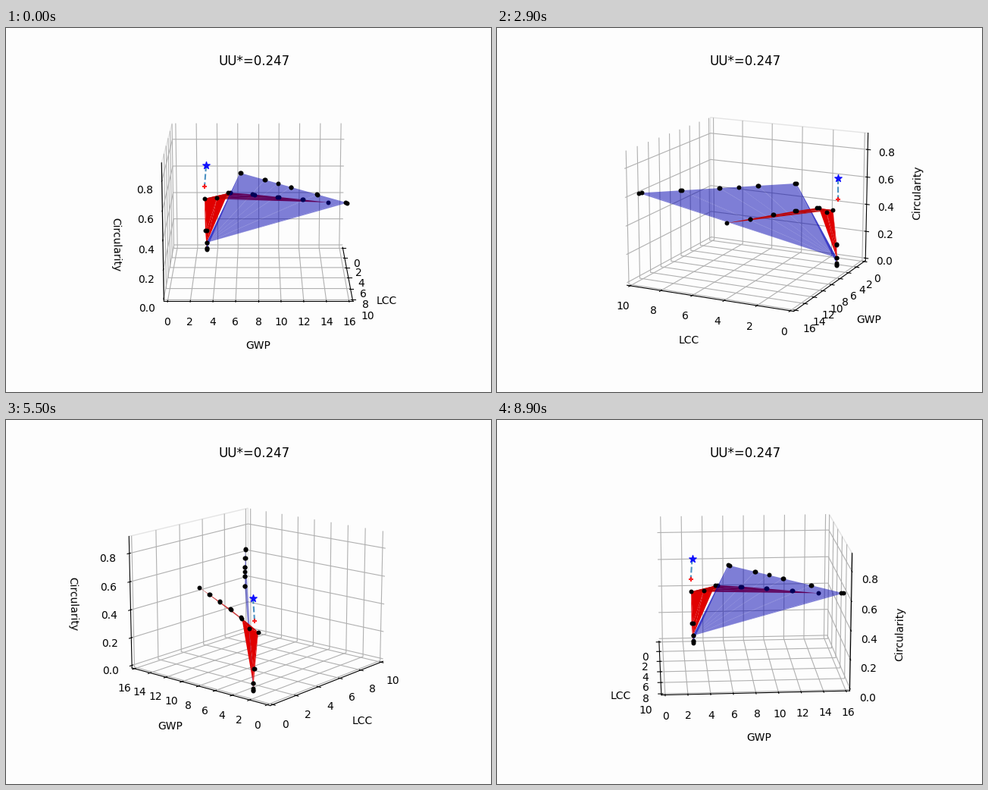
Animation, 640 px wide and 480 px high, one loop 9000 ms. Source, as a matplotlib script:

```python
import numpy as np
import matplotlib.pyplot as plt
from matplotlib.animation import FuncAnimation

FRAMES = 90
ELEV = 15
BG = "#fdfdfd"
UNIT = np.array([8.75, 14, 1.05])  # data per unit of the drawn box


def padded(top):
    """Limits from 0 to top with a small margin on both sides."""
    return -top / 48, top + top / 48


def between(a, b, t):
    return np.asarray(a) + t[:, None] * np.subtract(b, a)


# columns: LCC, GWP, circularity
foot = [0.794, 2.968, 0.053]
low = [0.787, 2.968, 0.006]

# rays of near-twin points, spreading away from one place on each line
d = np.array([-0.37, -0.125, 0, 0.125, 0.37, 0.63])
t = np.unique(0.37 + np.outer(d, [0.985, 1.015]))
blue = np.vstack([foot, low, between([2.565, 6.316, 0.629],
                                     [9.465, 15.69, 0.631], t)])
fan = [(0, 2, 1)] + [(0, k + 1, k) for k in range(2, len(blue) - 1)]

d = np.linspace(-1, 0, 5)
t = np.unique(1 + np.outer(d, [0.988, 1.012]))
ray = between([1.45, 5.2, 0], [4.419, 14.49, 0], t)
ray[:, 2] = 0.4485 + 0.0235 * np.sqrt(np.clip(t, 0, 1))
red = np.vstack([
    foot, [0.795, 2.960, 0.012], [0.796, 2.955, 0],
    [0.844, 2.83, 0.149], [0.846, 2.98, 0.149],
    [1.124, 2.80, 0.396], [1.22, 4.01, 0.402], ray,
])

utopia = np.array([0.80, 2.963, 0.632])
nearest = np.array([0.81, 2.80, 0.477])

fig = plt.figure(figsize=(6.4, 4.8), dpi=100, facecolor=BG)
ax = fig.add_subplot(projection="3d", facecolor=BG, computed_zorder=False)


def dots(points, **style):
    return ax.scatter(*points.T, depthshade=False, **style)


def front(points):
    """Artists of one surface: the sheet and its vertices."""
    return dots(points, color="black", marker=".", s=42)


groups = [
    (red, ax.plot_trisurf(*red.T, color="red"), front(red)),
    (blue, ax.plot_trisurf(*blue.T, triangles=fan, color="blue", alpha=0.5),
     front(blue)),
]

ax.plot(*np.array([utopia, nearest]).T, "--", color="C0", alpha=0.8)
dots(utopia[None], color="blue", marker="*", s=50, alpha=0.88, zorder=9)
dots(nearest[None], color="red", marker="+", alpha=0.85, zorder=9)

ax.set_xlim(*padded(10))
ax.set_ylim(*padded(16))
ax.set_zlim(*padded(0.9))
ax.set_xlabel("LCC", labelpad=10)
ax.set_ylabel("GWP", labelpad=10)
ax.set_zlabel("Circularity", labelpad=10)
ax.set_title("UU*=0.247")
for axis in (ax.xaxis, ax.yaxis, ax.zaxis):
    axis.pane.set(facecolor=BG, edgecolor=BG, alpha=1)
ax.yaxis.pane.set_edgecolor("#e4e4e4")


def update(i):
    azim = i * 360 / FRAMES
    ax.view_init(elev=ELEV, azim=azim)

    # the sheet reaching closest to the viewer is painted last
    a, e = np.radians([azim, ELEV])
    view = np.array([np.cos(e) * np.cos(a), np.cos(e) * np.sin(a), np.sin(e)])
    order = sorted(groups, key=lambda g: (g[0] / UNIT @ view).max())
    for z, (_, sheet, marks) in zip((3, 5), order):
        sheet.set_zorder(z)
        marks.set_zorder(z + 1)
    return []


anim = FuncAnimation(fig, update, frames=FRAMES, interval=100, repeat=True)
plt.show()
```
